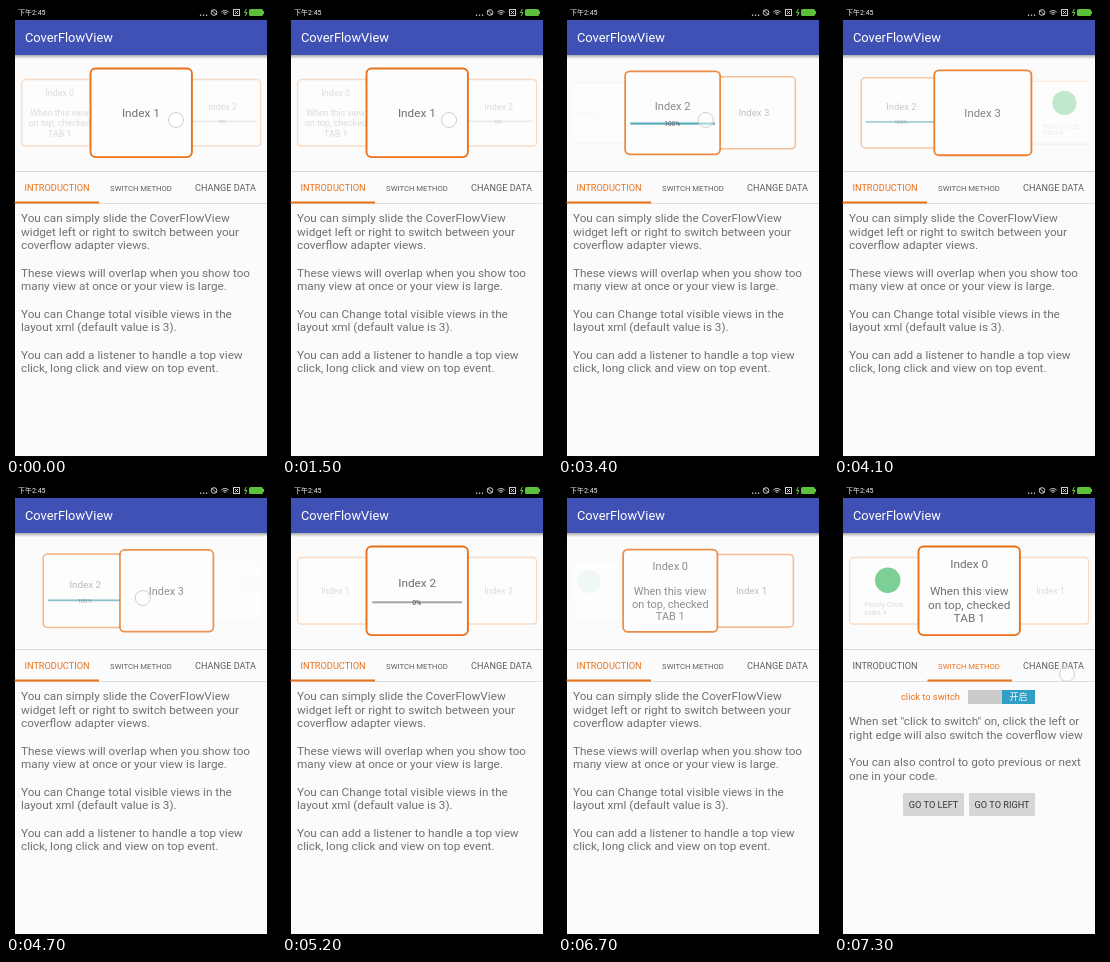
These frames come from a looping animation (270 by 450 pixels, 8.1 s). An HTML page with a canvas:

```html
<!DOCTYPE html>
<html lang="en">
<head>
<meta charset="utf-8">
<title>CoverFlowView</title>
<style>
  html, body { margin: 0; width: 100%; height: 100%; overflow: hidden; background: #000; }
  canvas { display: block; width: 270px; height: 450px; }
</style>
</head>
<body>
<canvas id="stage"></canvas>
<script>
const LOOP = 8100, TICK = 100;
const ORANGE = '#e8711a', GRAY = '#707070', PAPER = '#fbfbfb', BLUE = '#35a9c6';
const FONT = 'Roboto, "Noto Sans CJK SC", "Noto Sans CJK", sans-serif';
const LEFT = 9, WIDTH = 252, TAB = 85;
const MID = { x: 135.2, y: 106.8, w: 101.4, h: 88.6, gap: 81.5 };

// Each swipe: finger drag from start to release, then the cards settle until end.
const SWIPES = [
  { start: 1500, release: 1900, end: 2300, from: 1, to: 2, x0: 167, x1: 108 },
  { start: 2850, release: 3940, end: 4320, from: 2, to: 3, x0: 176, x1: 120 },
  { start: 4450, release: 4850, end: 5200, from: 3, to: 2, x0: 98, x1: 160 },
  { start: 5480, release: 5750, end: 6000, from: 2, to: 1, x0: 98, x1: 165 },
  { start: 6250, release: 6600, end: 7000, from: 1, to: 0, x0: 98, x1: 165 }
];

const TABS = [['INTRODUCTION', 51, 9.2], ['SWITCH METHOD', 135, 7.7], ['CHANGE DATA', 219.5, 9.1]];
const INTRO = [
  'You can simply slide the CoverFlowView',
  'widget left or right to switch between your',
  'coverflow adapter views.', '',
  'These views will overlap when you show too',
  'many view at once or your view is large.', '',
  'You can Change total visible views in the',
  'layout xml (default value is 3).', '',
  'You can add a listener to handle a top view',
  'click, long click and view on top event.'
];
const METHOD = [
  'When set "click to switch" on, click the left or',
  'right edge will also switch the coverflow view', '',
  'You can also control to goto previous or next',
  'one in your code.'
];

const canvas = document.getElementById('stage');
const ctx = canvas.getContext('2d');
const ratio = window.devicePixelRatio || 1;
canvas.width = 270 * ratio;
canvas.height = 450 * ratio;

const clamp = v => Math.max(0, Math.min(1, v));
const span = (t, a, b) => clamp((t - a) / (b - a));
const wave = u => (1 - Math.cos(Math.PI * u)) / 2;

function box(x, y, w, h, color) {
  ctx.fillStyle = color;
  ctx.fillRect(x, y, w, h);
}

function text(str, x, y, size, color, align = 'center', weight = 400) {
  ctx.font = `${weight} ${size}px ${FONT}`;
  ctx.textAlign = align;
  ctx.textBaseline = 'alphabetic';
  ctx.fillStyle = color;
  ctx.fillText(str, x, y + size * 0.355);
}

function lines(list, x, y) {
  list.forEach((str, i) => text(str, x, y + i * 13.65, 11.72, GRAY, 'left'));
}

function disc(x, y, r, fill, stroke) {
  ctx.beginPath();
  ctx.arc(x, y, r, 0, Math.PI * 2);
  if (fill) { ctx.fillStyle = fill; ctx.fill(); }
  if (stroke) { ctx.strokeStyle = stroke; ctx.lineWidth = 1; ctx.stroke(); }
}

function path(points, color) {
  ctx.beginPath();
  points.forEach(([x, y]) => ctx.lineTo(x, y));
  ctx.strokeStyle = color;
  ctx.lineWidth = 1;
  ctx.stroke();
}

function flowAt(t) {
  let pos = 1;
  for (const s of SWIPES) {
    if (t < s.start) break;
    const rest = 1 - span(t, s.release, s.end);
    const k = t < s.release ? 0.5 * span(t, s.start, s.release) : 1 - 0.5 * rest * rest;
    pos = s.from + (s.to - s.from) * k;
  }
  return pos;
}

function loadAt(t) {
  return t < 5200 ? wave(span(t, 2280, 2580)) : wave(span(t, 5200, 5500));
}

function content(index, load, alpha) {
  if (index === 0) {
    ['Index 0', '', 'When this view', 'on top, checked', 'TAB 1']
      .forEach((str, i) => text(str, 0, -26.5 + i * 13.5, 11.8, GRAY));
  } else if (index === 2) {
    text('Index 2', 0, -7.5, 11.8, GRAY);
    box(-45, 10.5, 90, 2, '#a5a5a5');
    box(-45, 10.5, 90 * load, 2, BLUE);
    text(Math.round(load * 100) + '%', -0.5, 11.8, 7, '#444');
  } else if (index === 4) {
    ctx.globalAlpha = Math.min(1, alpha * 2.6);
    disc(0, -14, 17, '#2fb457');
    ctx.globalAlpha = alpha;
    text('Plomly Circle', -31, 19, 9, GRAY, 'left');
    text('Index 4', -31, 28.5, 9, GRAY, 'left');
  } else {
    text('Index ' + index, -0.3, 0.2, 11.8, GRAY);
  }
}

function card(slot, pos, load) {
  const p = slot - pos, d = Math.abs(p);
  const alpha = 1 - 0.76 * d;
  if (alpha <= 0) return;
  const scale = 1 - 0.25 * d;
  ctx.save();
  ctx.translate(MID.x + p * MID.gap, MID.y);
  ctx.scale(scale, scale);
  ctx.beginPath();
  ctx.roundRect(-MID.w / 2, -MID.h / 2, MID.w, MID.h, 5);
  ctx.fillStyle = '#fdfdfd';
  ctx.fill();
  ctx.globalAlpha = alpha;
  ctx.strokeStyle = ORANGE;
  ctx.lineWidth = 1.9;
  ctx.stroke();
  content((slot + 5) % 5, load, alpha);
  ctx.restore();
}

function cards(t) {
  const pos = flowAt(t), load = loadAt(t), near = Math.round(pos);
  ctx.save();
  ctx.beginPath();
  ctx.rect(14.5, 50, 241, 113);
  ctx.clip();
  [-2, -1, 0, 1, 2].map(i => near + i)
    .sort((a, b) => Math.abs(b - pos) - Math.abs(a - pos))
    .forEach(slot => card(slot, pos, load));
  ctx.restore();
}

function statusBar() {
  text('下午2:45', 12, 6.8, 7, '#eee', 'left');
  [194.5, 197.5, 200.5].forEach(x => box(x - 0.6, 8.5, 1.3, 1.3, '#ddd'));
  disc(208, 6.5, 2.8, null, '#ccc');
  path([[205.5, 4], [210.5, 9]], '#ccc');
  for (const r of [1.5, 3.2, 5]) {
    ctx.beginPath();
    ctx.arc(219, 9.5, r, -Math.PI * 0.77, -Math.PI * 0.23);
    ctx.strokeStyle = '#ccc';
    ctx.stroke();
  }
  ctx.strokeRect(227.5, 3.5, 6, 6);
  path([[229, 5], [232, 8]], '#ccc');
  path([[232, 5], [229, 8]], '#ccc');
  path([[240.5, 3], [238.5, 6.5], [241, 6.5], [239, 10]], '#6c4');
  ctx.beginPath();
  ctx.roundRect(243, 3, 14, 7, 1.5);
  ctx.fillStyle = '#5cc03a';
  ctx.fill();
  box(257, 5, 1, 3, '#5cc03a');
}

function appBar() {
  box(LEFT, 14, WIDTH, 35, '#3f51b5');
  const shade = ctx.createLinearGradient(0, 49, 0, 53);
  shade.addColorStop(0, 'rgba(0,0,0,.32)');
  shade.addColorStop(1, 'rgba(0,0,0,0)');
  box(LEFT, 49, WIDTH, 4, shade);
  text('CoverFlowView', 19, 31.5, 12.85, '#fff', 'left');
}

function button(label, x, w) {
  ctx.beginPath();
  ctx.roundRect(x, 309, w, 23, 1.5);
  ctx.fillStyle = '#d5d6d6';
  ctx.fill();
  text(label, x + w / 2, 320.8, 9.2, '#333');
}

function methodPage() {
  text('click to switch', 67, 213, 9.3, ORANGE, 'left');
  box(134, 206, 67, 14, '#cbcbcb');
  box(168, 206, 33, 14, '#2f9fc5');
  text('开启', 184.5, 213, 9, '#fff');
  lines(METHOD, 15, 237);
  button('GO TO LEFT', 69, 61);
  button('GO TO RIGHT', 135, 66);
}

function pages(slide) {
  ctx.save();
  ctx.beginPath();
  ctx.rect(LEFT, 198, WIDTH, 252);
  ctx.clip();
  ctx.translate(-WIDTH * slide, 0);
  if (slide < 1) lines(INTRO, 15, 212);
  ctx.translate(WIDTH, 0);
  if (slide > 0) methodPage();
  ctx.restore();
}

function tabs(slide) {
  box(LEFT, 165, WIDTH, 1, '#dadada');
  box(LEFT, 197, WIDTH, 1, '#dedede');
  box(LEFT - 0.5 + TAB * slide, 195.5, 84.5, 2, ORANGE);
  TABS.forEach(([label, x, size], i) =>
    text(label, x, 182, size, i === Math.round(slide) ? ORANGE : '#5c5c5c'));
}

function touch(t) {
  let at = null;
  if (t < 1500) at = [170, 114];
  else if (t >= 7300) at = [233, 190];
  for (const s of SWIPES) {
    if (t >= s.start && t < s.release)
      at = [s.x0 + (s.x1 - s.x0) * span(t, s.start, s.release), 114];
  }
  if (at) disc(at[0], at[1], 7.5, 'rgba(255,255,255,.5)', '#cfcfcf');
}

function draw(t) {
  const slide = wave(span(t, 6950, 7200));
  ctx.setTransform(ratio, 0, 0, ratio, 0, 0);
  box(0, 0, 270, 450, '#000');
  box(LEFT, 49, WIDTH, 401, PAPER);
  statusBar();
  appBar();
  cards(t);
  tabs(slide);
  pages(slide);
  touch(t);
}

const begin = performance.now();
function frame() {
  const t = (performance.now() - begin) % LOOP;
  draw(Math.floor(t / TICK) * TICK);
  requestAnimationFrame(frame);
}
frame();
</script>
</body>
</html>
```
